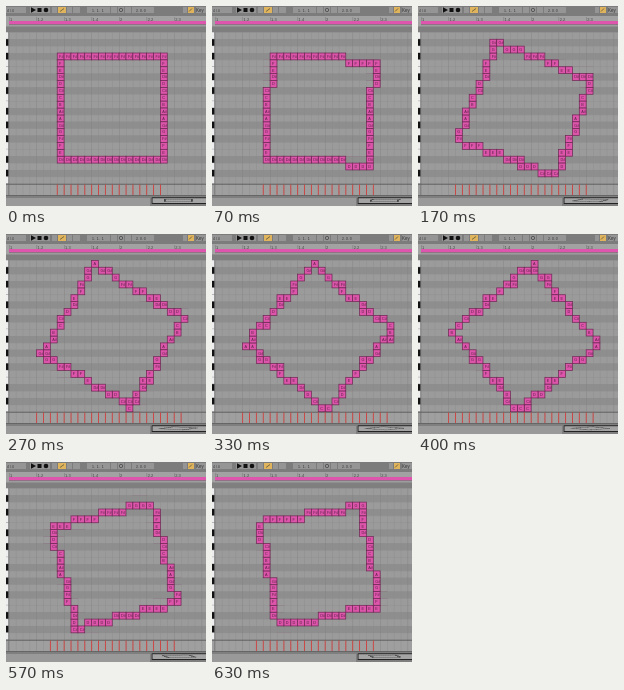
Recreate the animation shown at these times as an HTML page with a canvas. Size 200 by 200 pixels, loop 660 ms.

```html
<!DOCTYPE html>
<html>
<head>
<meta charset="utf-8">
<style>
html, body { margin: 0; width: 100%; height: 100%; overflow: hidden; background: #989898; }
canvas { display: block; width: 200px; height: 200px; }
</style>
</head>
<body>
<canvas width="200" height="200"></canvas>
<script>
const ctx = document.querySelector('canvas').getContext('2d');
const LOOP = 660, CELL = 6.88, LEFT = 51.2, TOP = 47;
const HALF = 7.5, CENTER = 7.7, TURN = 5 * Math.PI / 180;
const NAMES = ['C', 'C#', 'D', 'D#', 'E', 'F', 'F#', 'G', 'G#', 'A', 'A#', 'B'];
const colX = col => LEFT + col * CELL;
const rowY = row => TOP + row * CELL;
const pitch = row => (30 - row) % 12;

function rect(x, y, w, h, color) {
  ctx.fillStyle = color;
  ctx.fillRect(x, y, w, h);
}

function text(str, x, y, size, color = '#333') {
  ctx.font = `${size}px Arial, "Liberation Sans", sans-serif`;
  ctx.fillStyle = color;
  ctx.fillText(str, x, y);
}

function line(x1, y1, x2, y2) {
  ctx.beginPath();
  ctx.moveTo(x1, y1);
  ctx.lineTo(x2, y2);
  ctx.stroke();
}

function drawToolbar() {
  rect(0, 0, 200, 10, '#7c7c7c');
  for (const [x, w] of [[0, 20], [24, 20], [46, 5], [61, 5], [67, 7], [81, 23], [105, 6], [112, 6], [119, 6], [126, 22], [177, 4], [190, 10]])
    rect(x, 1, w, 6, '#959595');
  for (const x of [52, 182]) rect(x, 1, x < 100 ? 8 : 6, 6, '#dfb45c');
  text('4 / 4', 1, 5.5, 3.5);
  text('1.  1.  1', 86, 5.5, 3.5);
  text('2. 0. 0', 130, 5.5, 3.5);
  text('Key', 190, 6, 4.5);
  ctx.fillStyle = '#111';
  ctx.beginPath();
  ctx.moveTo(25, 1.3);
  ctx.lineTo(30, 4);
  ctx.lineTo(25, 6.7);
  ctx.fill();
  ctx.beginPath();
  ctx.arc(40, 4, 2.3, 0, 7);
  ctx.fill();
  rect(31.5, 2, 4, 4, '#111');
  ctx.strokeStyle = '#333';
  ctx.lineWidth = .6;
  line(54, 5.5, 58, 2.5);
  line(183, 5.5, 186, 2.5);
  ctx.beginPath();
  ctx.arc(115, 4, 1.7, 0, 7);
  ctx.stroke();
}

function drawRuler() {
  rect(0, 10, 200, 11, '#a2a2a2');
  rect(0, 20.5, 200, 6, '#7f7f7f');
  ['1', '1.2', '1.3', '1.4', '2', '2.2', '2.3'].forEach((label, i) => {
    const x = colX(i * 4 - 7);
    rect(x, 11, .5, 4, '#777');
    text(label, x + 1, 14.5, 4, '#444');
  });
  rect(3, 15, 197, 3.5, '#dd55ac');
  rect(3, 18.5, 197, .6, '#666');
}

function drawRoll() {
  for (let row = -3; row < 19; row++) {
    const black = NAMES[pitch(row)].length > 1;
    rect(0, rowY(row), 200, CELL, black ? '#8e8e8e' : '#9b9b9b');
    rect(0, rowY(row), 200, .3, '#8c8c8c');
    rect(0, rowY(row), 2.5, CELL - .5, black ? '#111' : '#eee');
  }
  rect(0, 178, 200, 12, '#9f9f9f');
  for (let col = -7; col < 22; col++)
    rect(colX(col), 26.5, .4, 163, (col + 7) % 4 ? '#8c8c8c' : '#808080');
  rect(0, 177.8, 200, .8, '#555');
  rect(2.5, 26, .5, 164, '#666');
}

function drawFooter() {
  rect(0, 189, 200, 11, '#7f7f7f');
  rect(0, 189, 200, .6, '#555');
  rect(0, 192, 144, 8, '#999');
  rect(145, 191, 55, 7, '#a4a4a4');
  ctx.strokeStyle = '#222';
  ctx.lineWidth = 1;
  ctx.strokeRect(146, 191.7, 56, 5.8);
}

// Outline of a turning square, snapped to the note grid.
function squareCells(angle) {
  const cells = new Map();
  for (let side = 0; side < 4; side++) {
    const a = angle + side * Math.PI / 2, c = Math.cos(a), s = Math.sin(a);
    for (let u = -HALF; u < HALF; u++) {
      const col = Math.round(CENTER + u * c + HALF * s);
      const row = Math.round(CENTER + u * s - HALF * c);
      cells.set(col + ',' + row, [col, row]);
    }
  }
  return [...cells.values()];
}

function drawNotes(cells) {
  for (const col of new Set(cells.map(cell => cell[0])))
    rect(colX(col) - .4, 178.5, .9, 10.5, '#d0403e');
  ctx.strokeStyle = '#6b2852';
  ctx.lineWidth = .7;
  for (const [col, row] of cells) {
    const x = colX(col), y = rowY(row);
    rect(x, y, CELL, CELL, '#dc55aa');
    ctx.strokeRect(x, y, CELL, CELL);
    text(NAMES[pitch(row)], x + 1.9, y + 4.8, 3.8, '#5a2146');
    rect(158 + col * 1.8, 193 + row * .15, 1.6, .4, '#444');
  }
}

// The display refreshes 20 times per loop, on whole hundredths of a second.
function draw(now) {
  const tick = Math.floor(now % LOOP / 10);
  const refresh = Math.floor((3 * tick + 1) / 10);
  const step = Math.max(0, Math.floor(refresh * 10 / 11 - .4));
  drawToolbar();
  drawRuler();
  drawRoll();
  drawFooter();
  drawNotes(squareCells(step * TURN));
  requestAnimationFrame(() => draw(performance.now() - start));
}

const start = performance.now();
draw(0);
</script>
</body>
</html>
```
